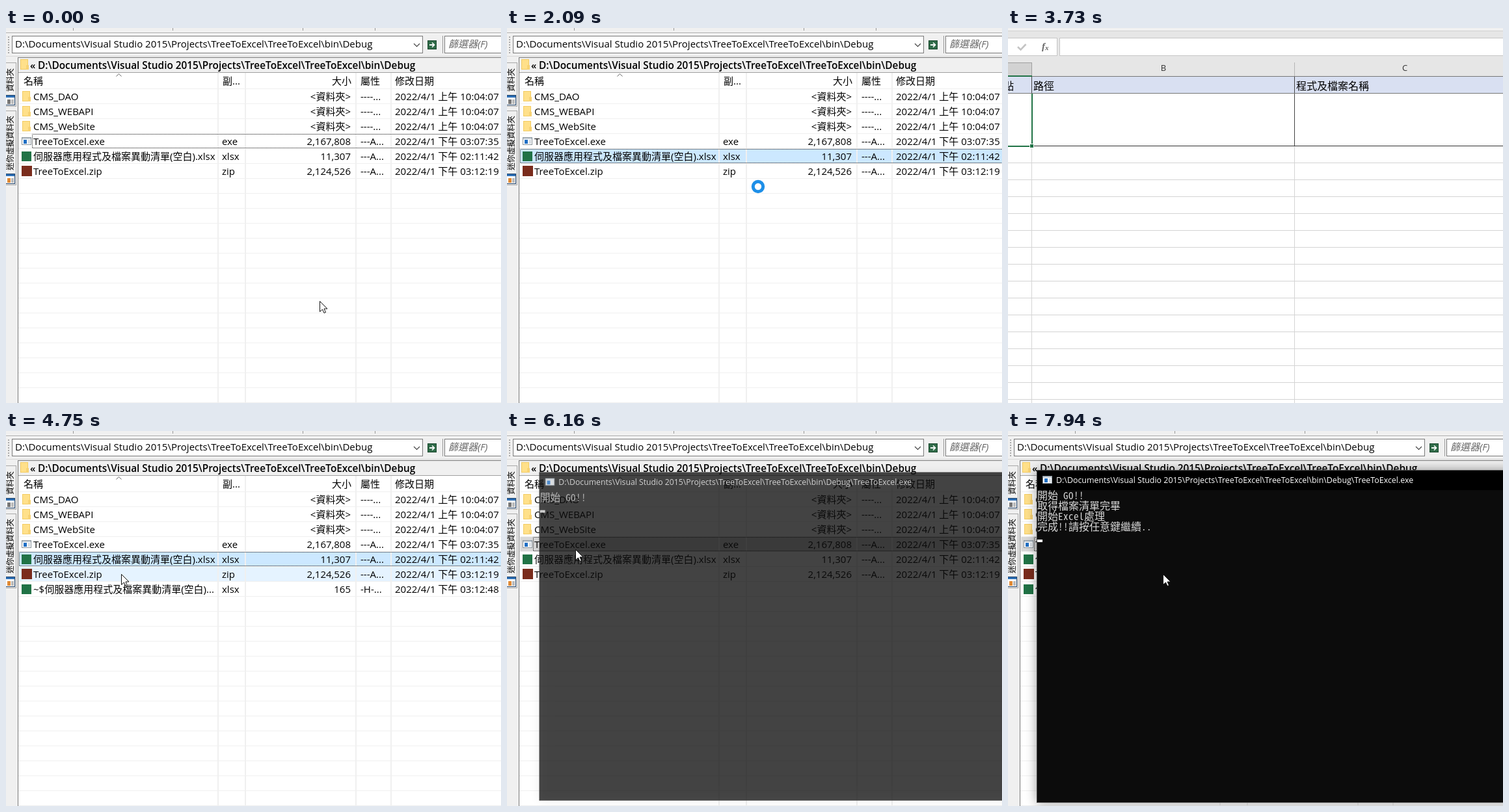
These frames come from a looping animation (761x577 px, 8 s). An HTML page with a canvas:

```html
<!DOCTYPE html>
<html lang="zh-Hant">
<head>
<meta charset="utf-8">
<title>TreeToExcel</title>
<style>
html, body { margin: 0; width: 100%; height: 100%; overflow: hidden; background: #fff; }
canvas { display: block; }
</style>
</head>
<body>
<canvas id="stage" width="761" height="577"></canvas>
<script>
const W = 761, H = 577, LOOP = 8000;
const ctx = document.getElementById('stage').getContext('2d');
const SANS = '"Open Sans", "Noto Sans CJK TC", "Noto Sans CJK JP", "Noto Sans CJK", sans-serif';
const MONO = '"Noto Sans Mono CJK TC", "Liberation Mono", "Noto Sans CJK TC", "Noto Sans CJK", monospace';
const FOLDER = 'D:\\Documents\\Visual Studio 2015\\Projects\\TreeToExcel\\TreeToExcel\\bin\\Debug';
const SHEET_NAME = '伺服器應用程式及檔案異動清單';
const ROW_TOP = 93, ROW_H = 23, COLUMNS = [325, 367, 537, 591];

const EXE_ROW = 3, XLSX_ROW = 4;
const FILES = [
  ['folder', 'CMS_DAO', '', '<資料夾>', '----...', '上午 10:04:07'],
  ['folder', 'CMS_WEBAPI', '', '<資料夾>', '----...', '上午 10:04:07'],
  ['folder', 'CMS_WebSite', '', '<資料夾>', '----...', '上午 10:04:07'],
  ['exe', 'TreeToExcel.exe', 'exe', '2,167,808', '---A...', '下午 03:07:35'],
  ['xlsx', SHEET_NAME + '(空白).xlsx', 'xlsx', '11,307', '---A...', '下午 02:11:42'],
  ['zip', 'TreeToExcel.zip', 'zip', '2,124,526', '---A...', '下午 03:12:19']
];
const LOCK_FILE = ['xlsx', '~$' + SHEET_NAME + '(空白)...', 'xlsx', '165', '-H-...', '下午 03:12:48'];
const RESULT_FILE = ['xlsx', SHEET_NAME + '.xlsx', 'xlsx', '11,402', '---A...', '下午 03:12:55'];

// Mouse path: time, x, y
const PATH = [
  [30, 482, 420], [260, 266, 298], [420, 266, 298], [590, 200, 180], [750, 200, 180],
  [1590, 144, 203], [1660, 155, 213], [2090, 385, 243], [2430, 677, 457], [2500, 677, 457],
  [2850, 429, 258], [3190, 429, 258], [3320, 308, 200], [3660, 632, 125], [3730, 632, 125],
  [4330, 740, 30], [4750, 177, 220], [5090, 125, 186], [5230, 125, 186], [6020, 105, 182],
  [6630, 105, 182], [7120, 238, 220]
];

function mouseAt(t) {
  const i = PATH.findIndex(key => key[0] > t);
  if (i === 0) return PATH[0].slice(1);
  if (i < 0) return PATH[PATH.length - 1].slice(1);
  const [t0, x0, y0] = PATH[i - 1], [t1, x1, y1] = PATH[i];
  const u = (t - t0) / (t1 - t0);
  return [x0 + (x1 - x0) * u, y0 + (y1 - y0) * u];
}

function box(x, y, w, h, fill, border) {
  if (border) {
    ctx.fillStyle = border;
    ctx.fillRect(x, y, w, h);
    x++; y++; w -= 2; h -= 2;
  }
  ctx.fillStyle = fill;
  ctx.fillRect(x, y, w, h);
}

function text(str, x, y, { size = 15, color = '#000', style = '', align = 'left', family = SANS } = {}) {
  ctx.font = `${style} ${size}px ${family}`;
  ctx.fillStyle = color;
  ctx.textAlign = align;
  ctx.fillText(str, x, y);
}

function line(points, color, width = 1) {
  ctx.beginPath();
  points.forEach(([x, y]) => ctx.lineTo(x, y));
  ctx.strokeStyle = color;
  ctx.lineWidth = width;
  ctx.stroke();
}

function dottedRect(x, y, w, h) {
  ctx.setLineDash([1, 1]);
  ctx.lineDashOffset = .5;
  ctx.strokeStyle = '#222';
  ctx.lineWidth = 1;
  ctx.strokeRect(x + .5, y + .5, w, h);
  ctx.setLineDash([]);
}

function appIcon(x, y) {
  box(x, y, 15, 12, '#fff', '#8a949c');
  box(x + 1, y + 1, 13, 2, '#c3ccd4');
  box(x + 3, y + 4, 5, 6, '#1f6fc4');
  box(x + 10, y + 4, 3, 6, '#d5dbe0');
}

const ICONS = {
  folder(x, y) {
    box(x + 1, y - 8, 12, 16, '#ffe08a', '#f3cc64');
    box(x + 10, y + 1, 4, 7, '#f7d274');
  },
  exe: (x, y) => appIcon(x, y - 6),
  xlsx: (x, y) => box(x, y - 7, 15, 15, '#217346'),
  zip: (x, y) => box(x, y - 8, 16, 16, '#7a2c1c')
};

function sideTab(top, bottom, label) {
  box(-1, top, 17, bottom - top, '#f0f0f0', '#a8a8a8');
  ctx.save();
  ctx.translate(6.5, bottom - 23);
  ctx.rotate(-Math.PI / 2);
  text(label, 0, 4.5, { size: 12 });
  ctx.restore();
  box(-1, bottom - 18, 15, 16, '#fff', '#1d3f66');
  box(0, bottom - 17, 13, 3, '#2d6fb5');
  box(2, bottom - 11, 5, 7, label.length > 3 ? '#e08a35' : '#777');
  box(8, bottom - 11, 4, 7, '#bbb');
}

function drawChrome() {
  box(0, 0, W, H, '#f0f0f0');
  box(0, 7, W, 1, '#a8a8a8');
  box(0, 8, W, 1, '#fff');
  for (const x of [103, 256, 456, 567]) box(x, 0, 1, 4, '#999');
  for (let y = 13; y < 40; y += 4) box(3, y, 2, 2, '#aaa');
  box(9, 12, 632, 27, '#fff', '#7a7a7a');
  text(FOLDER, 14, 30);
  line([[627, 24], [631.5, 28.5], [636, 24]], '#444', 1.2);
  box(648, 19, 14, 14, '#2f6b48', '#1d4a30');
  line([[651, 26], [658, 26]], '#fff', 2);
  line([[655, 22.5], [658.5, 26], [655, 29.5]], '#fff', 1.6);
  box(671, 12, 1, 27, '#999');
  box(674, 12, 100, 27, '#fff', '#7a7a7a');
  text('篩選器(F)', 680, 30, { style: 'italic', color: '#666' });
  box(0, 43, W, 1, '#d8d8d8');
  sideTab(53, 121, '資料夾');
  sideTab(127, 242, '迷你虛擬資料夾');
  box(18, 45, W, H, '#fff', '#7a7a7a');
  box(19, 46, W, 22, '#f0f0f0');
  box(19, 68, W, 1, '#a0a0a0');
  ICONS.folder(21, 56);
  text('«', 37, 63, { style: '600' });
  text(FOLDER, 49, 63, { style: '600', size: 15.35 });
}

function drawFiles(t, hover) {
  const focus = t >= 1100 && t < 5650 ? XLSX_ROW : EXE_ROW;
  const files = [...FILES];
  if (t >= 4330 && t < 4900) files.push(LOCK_FILE);
  if (t >= 7940) files.push(RESULT_FILE);

  files.forEach((file, i) => {
    const y = ROW_TOP + i * ROW_H;
    if (i === focus && t >= 1100) box(20, y + 1, W, ROW_H - 1, t < 6090 ? '#cce8ff' : '#d9d9d9');
    else if (i === hover) box(20, y + 1, W, ROW_H - 1, '#e5f3ff');
  });
  for (let y = ROW_TOP; y < H; y += ROW_H) box(19, y, W, 1, '#f0f0f0');
  for (const x of COLUMNS) box(x, 69, 2, H, '#f0f0f0');

  text('名稱', 27, 87);
  line([[169.5, 74.5], [173.5, 70.5], [177.5, 74.5]], '#666');
  text('副...', 333, 87);
  text('大小', 531, 87, { align: 'right' });
  text('屬性', 545, 87);
  text('修改日期', 598, 87);

  files.forEach(([icon, name, ext, size, attributes, time], i) => {
    const middle = ROW_TOP + 12 + i * ROW_H, base = middle + 6;
    ICONS[icon](24, middle);
    text(name, 42, base);
    text(ext, 332, base);
    text(size, 530, base, { align: 'right' });
    text(attributes, 545, base);
    text('2022/4/1 ' + time, 598, base);
  });
  const left = focus === XLSX_ROW ? 20 : 40;
  dottedRect(left, ROW_TOP + focus * ROW_H + 1, W, ROW_H - 2);
}

function drawSpreadsheet(loaded) {
  box(0, 0, W, H, '#e6e6e6');
  box(0, 0, W, 4, '#f1f1f1');
  box(0, 4, W, 1, '#d0d0d0');
  box(-1, 15, 77, 28, '#fff', '#c6c6c6');
  box(79, 15, W, 28, '#fff', '#c6c6c6');
  line([[15, 29], [19.5, 33.5], [27.5, 25]], '#c4c4c4', 2.6);
  text('f', 52, 33, { size: 15, style: 'italic bold', color: '#666', family: '"Liberation Serif", serif' });
  text('x', 57, 34, { size: 11, style: 'italic bold', color: '#666', family: '"Liberation Serif", serif' });
  box(-1, 53, 38, 22, '#d2d2d2', '#9f9f9f');
  if (!loaded) {
    box(0, 100, W, 1, '#999');
    return;
  }
  text('B', 239, 66, { size: 13, align: 'center', color: '#333' });
  text('C', 610, 66, { size: 13, align: 'center', color: '#333' });
  box(440, 53, 1, 21, '#b5b5b5');
  box(0, 75, W, H, '#fff');
  for (let y = 207; y < H; y += 26) box(0, y, W, 1, '#d4d4d4');
  box(0, 75, W, 25, '#d9e0f2');
  for (const x of [36, 440]) {
    box(x, 182, 1, H, '#d4d4d4');
    box(x, 75, 1, 107, '#444');
  }
  box(0, 74, W, 1, '#777');
  box(0, 100, W, 1, '#777');
  box(0, 181, W, 1, '#333');
  text('點', -7, 95, { size: 16 });
  text('路徑', 39, 95, { size: 16 });
  text('程式及檔案名稱', 443, 95, { size: 16 });
  box(0, 73, 37, 2, '#217346');
  box(36, 101, 2, 80, '#217346');
  box(0, 181, 37, 2, '#217346');
  box(33, 178, 7, 7, '#217346', '#fff');
}

// Console cells are 8 px wide; CJK characters take two.
function consoleLine(str, row) {
  let x = 45;
  for (const ch of str) {
    const wide = ch > '\u2000';
    text(ch, x, 105 + row * 16, { size: wide ? 16 : 15, color: '#d8d8d8', family: MONO });
    x += wide ? 16 : 8;
  }
}

function drawConsole(t) {
  const u = Math.min(1, (t - 6020) / 280), rest = (1 - u) ** 2;
  const lines = ['開始 GO!!'];
  if (t >= 6230) lines.push('取得檔案清單完畢');
  if (t >= 6630) lines.push('開始Excel處理');
  if (t >= 7320) lines.push('完成!!請按任意鍵繼續..');

  ctx.save();
  ctx.globalAlpha = 1 - rest;
  ctx.translate(545, 316);
  ctx.scale(1 - .046 * rest, 1 - .056 * rest);
  ctx.translate(-545, -316);
  ctx.save();
  ctx.shadowColor = `rgba(0,0,0,${.4 * u * u})`;
  ctx.shadowBlur = 16;
  box(44, 60, 1002, 512, '#0c0c0c');
  ctx.restore();
  box(44, 60, 1, 512, '#444');
  box(44, 60, 1002, 1, '#444');
  box(44, 571, 1002, 1, '#444');
  if (u === 1) box(45, 61, 1000, 30, '#000');
  appIcon(53, 69);
  text(FOLDER + '\\TreeToExcel.exe', 74, 80, { size: 12.4, color: '#fff' });
  lines.forEach(consoleLine);
  box(45, 103 + lines.length * 16, 8, 4, '#fff');
  ctx.restore();
}

function polygon(points, fill, stroke) {
  ctx.beginPath();
  points.forEach(([x, y]) => ctx.lineTo(x, y));
  ctx.closePath();
  ctx.fillStyle = fill;
  ctx.fill();
  ctx.strokeStyle = stroke;
  ctx.lineWidth = 1;
  ctx.stroke();
}

function drawMouse(t, x, y) {
  if (t >= 3700 && t < 4330) return;
  ctx.save();
  ctx.translate(Math.round(x) + .5, Math.round(y) + .5);
  if (t >= 1630 && t < 3190) {
    ctx.beginPath();
    ctx.arc(-.5, -.5, 7.7, 0, Math.PI * 2);
    ctx.fillStyle = '#fff';
    ctx.fill();
    ctx.strokeStyle = t < 2500 ? '#1d8fe8' : '#38a0ee';
    ctx.lineWidth = 5;
    ctx.stroke();
  } else if (t >= 3190 && t < 3700) {
    const arm = [[-3, -9], [3, -9], [3, -3]];
    const cross = [0, 1, 2, 3].flatMap(turn => arm.map(([px, py]) => {
      for (let i = 0; i < turn; i++) [px, py] = [-py, px];
      return [px, py];
    }));
    polygon(cross, '#fff', '#222');
  } else {
    polygon([[0, 0], [0, 16], [4, 12.5], [6.5, 18], [9, 17], [6.5, 11.5], [11.5, 11.5]], '#fff', '#111');
  }
  ctx.restore();
}

function draw(t) {
  const [x, y] = mouseAt(t);
  const hover = t < 6300 ? Math.floor((y - ROW_TOP) / ROW_H) : -1;
  drawChrome();
  drawFiles(t, hover);
  if (t >= 2500 && t < 4460) {
    ctx.globalAlpha = t < 4330 ? Math.min(1, (t - 2430) / 210) : .4;
    drawSpreadsheet(t >= 2990);
    ctx.globalAlpha = 1;
  }
  if (t >= 6090) drawConsole(t);
  drawMouse(t, x, y);
}

const start = performance.now();
function tick() {
  draw((performance.now() - start) % LOOP);
  requestAnimationFrame(tick);
}
tick();
</script>
</body>
</html>
```
